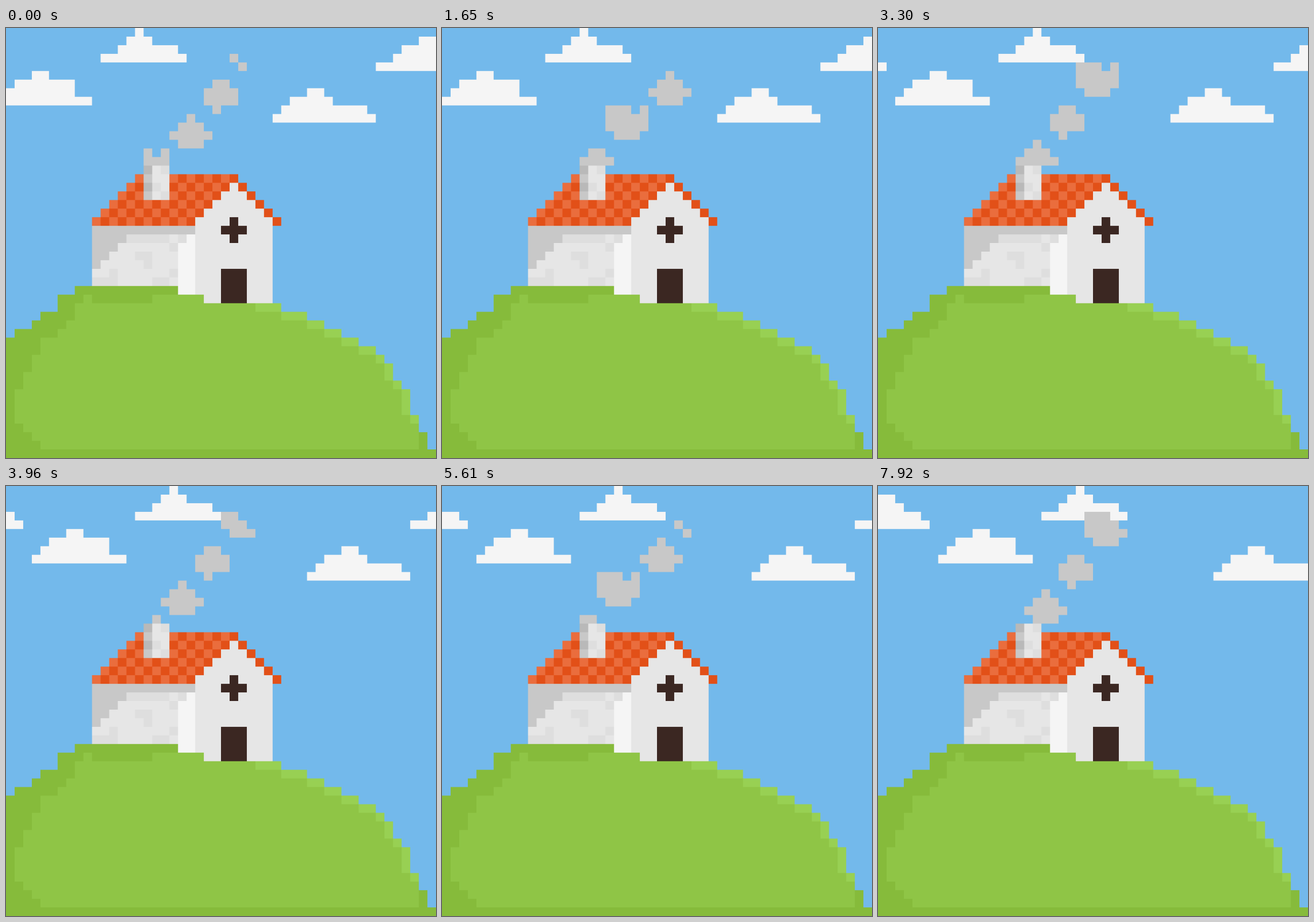
Animation, 748 px wide and 748 px high, one loop 8 s. Source, as an HTML page with a canvas:

```html
<!DOCTYPE html>
<html lang="en">
<head>
<meta charset="utf-8">
<title>House on a hill</title>
<style>
html, body { margin: 0; width: 100%; height: 100%; overflow: hidden; background: #73b9eb; }
canvas { display: block; width: 748px; height: 748px; }
</style>
</head>
<body>
<canvas id="stage" width="748" height="748"></canvas>
<script>
const CELL = 15, GRID = 50, STEP = 330, LOOP = 8000;
const SKY = '#73b9eb', WHITE = '#f5f5f5', WALL = '#e6e6e6', STONE = '#dedede', SHADE = '#c8c8c8';
const GRASS = '#8fc546', GRASS_DARK = '#86bb3b', GRASS_LIGHT = '#98d053';
const TILE = '#e25018', TILE_LIGHT = '#ea6d3d', WOOD = '#3b2722';

// The scene is painted on whole cells, then scaled smoothly to the stage.
const stage = document.getElementById('stage').getContext('2d');
const buffer = document.createElement('canvas');
buffer.width = buffer.height = CELL * GRID;
const ctx = buffer.getContext('2d');

// Fills cells from (x0, y0) up to, but not including, (x1, y1).
function fill(color, x0, y0, x1 = x0 + 1, y1 = y0 + 1) {
  if (x1 <= x0) return;
  ctx.fillStyle = color;
  ctx.fillRect(x0 * CELL, y0 * CELL, (x1 - x0) * CELL, (y1 - y0) * CELL);
}

// A cloud spreads from its peak: left on a curve, right with a shoulder.
const SKY_WIDTH = 57;
const clouds = [
  { peak: 15, width: 1, top: 0, left: 3.55, right: 5 },
  { peak: 3, width: 2, top: 5, left: 4.2, right: 5, shoulder: 0.5 },
  { peak: 35, width: 2, top: 7, left: 4.2, right: 6 },
  { peak: 48, width: 3, top: 1, left: 4.8, right: 4 }
];

function drawClouds(shift) {
  for (const { peak, width, top, left, right, shoulder = 0.2 } of clouds)
    [0, shoulder, 1 - shoulder, 1].forEach((spread, i) => {
      const start = peak + shift - Math.round(left * (i / 3) ** 0.9);
      const end = peak + shift + width + Math.round(right * spread);
      for (const wrap of [0, SKY_WIDTH]) fill(WHITE, start - wrap, top + i, end - wrap);
    });
}

const puffShapes = [
  ['..##.', '.####', '.####', '..#..'],
  ['...#..', '..###.', '.#####', '..###.'],
  ['###.#', '#####', '#####', '.###.']
];
const SMOKE_STEPS = 13;

// Smoke shows above and right of the chimney and thins out along a diagonal.
const inSmokeArea = (x, y) => x >= 16 && y >= 3 && y <= 15 && x - y <= 23;

function drawSmoke(step) {
  const drift = Math.floor(step * 12 / 13 + 0.65);
  for (let n = -1; n <= 5; n++) {
    const left = 22 - 4 * n + drift;
    const top = 6 + Math.floor(n * 13 / 3) - step;
    puffShapes[(n + 3) % 3].forEach((row, j) => [...row].forEach((c, i) => {
      if (c === '#' && inSmokeArea(left + i, top + j)) fill(SHADE, left + i, top + j);
    }));
  }
}

// Whole-cell position at row y on a line through [row, column] points.
function outline(points, y) {
  const i = points.findIndex(([row]) => row >= y);
  if (i < 0) return points.at(-1)[1];
  if (i === 0) return points[0][1];
  const [y0, x0] = points[i - 1], [y1, x1] = points[i];
  return Math.floor(x0 + (x1 - x0) * (y - y0) / (y1 - y0));
}

const hillLeft = [[30, 8], [31, 6], [32, 6], [36, 0]];
const hillRight = [[30, 20], [31, 23], [32, 32], [33, 35], [37, 43], [39, 45], [42, 47], [47, 49], [49, 50]];
const hillShade = [[31, 9], [33, 8], [35, 6], [36, 4.5], [42, 1.5], [45, 1], [48, 4]];

function drawHill() {
  for (let y = 30; y < GRID; y++) {
    const left = outline(hillLeft, y), right = outline(hillRight, y);
    fill(GRASS, left, y, right);
    fill(GRASS_DARK, left, y, outline(hillShade, y));
    if (y >= 32 && y < 46) {
      const rim = Math.min(outline(hillRight, y - 1), right - 1);
      fill(GRASS_LIGHT, Math.max(rim, right - 3), y, right);
    }
  }
  // Shadow of the house and the dark foot of the hill
  fill(GRASS_DARK, 8, 30, 20);
  fill(GRASS_DARK, 10, 31, 17);
  fill(GRASS_DARK, 48, 47, 49, 49);
  fill(GRASS_DARK, 0, 49, GRID);
}

function drawSideWall() {
  fill(WALL, 10, 23, 22, 30);
  fill(SHADE, 10, 23, 22);
  for (let i = 0; i < 4; i++) fill(SHADE, 10, 24 + i, 14 - i);
  fill(STONE, 14, 24, 19);
  fill(STONE, 20, 24);
  fill(STONE, 19, 25);
  fill(STONE, 15, 26, 17);
  fill(STONE, 16, 27);
  fill(STONE, 12, 28);
  fill(STONE, 19, 28);
  fill(STONE, 10, 29, 13);
  fill(STONE, 17, 29, 19);
  fill(WHITE, 21, 24);
  fill(WHITE, 20, 25, 22, 31);
}

function drawFront() {
  // Checkered roof beside a widening gable
  for (let i = 0; i < 6; i++) {
    const y = 17 + i;
    for (let x = 15 - i; x < 27 - i; x++) fill((x + y) % 2 ? TILE : TILE_LIGHT, x, y);
    fill(WALL, 27 - i, y, 26 + i);
    fill(TILE, 26 + i, y);
  }
  fill(WALL, 22, 23, 31, 31);
  fill(WALL, 23, 31, 31);

  // Window and door
  fill(WOOD, 26, 22, 27, 25);
  fill(WOOD, 25, 23, 28);
  fill(WOOD, 25, 28, 28, 32);
}

function drawChimney() {
  fill(WALL, 16, 16, 19, 20);
  for (let y = 16; y < 20; y++) fill(y % 2 ? SHADE : '#b9b9b9', 16, y);
  fill(STONE, 18, 16);
  fill(STONE, 17, 18);
  fill(STONE, 18, 19);
}

function draw(time) {
  const step = Math.floor((time % LOOP) / STEP);
  fill(SKY, 0, 0, GRID, GRID);
  drawClouds(Math.floor(step / 3));
  drawSmoke(step % SMOKE_STEPS);
  drawHill();
  drawSideWall();
  drawFront();
  drawChimney();
  stage.drawImage(buffer, 0, 0, 748, 748);
}

const start = performance.now();
function tick() {
  draw(performance.now() - start);
  requestAnimationFrame(tick);
}
tick();
</script>
</body>
</html>
```
